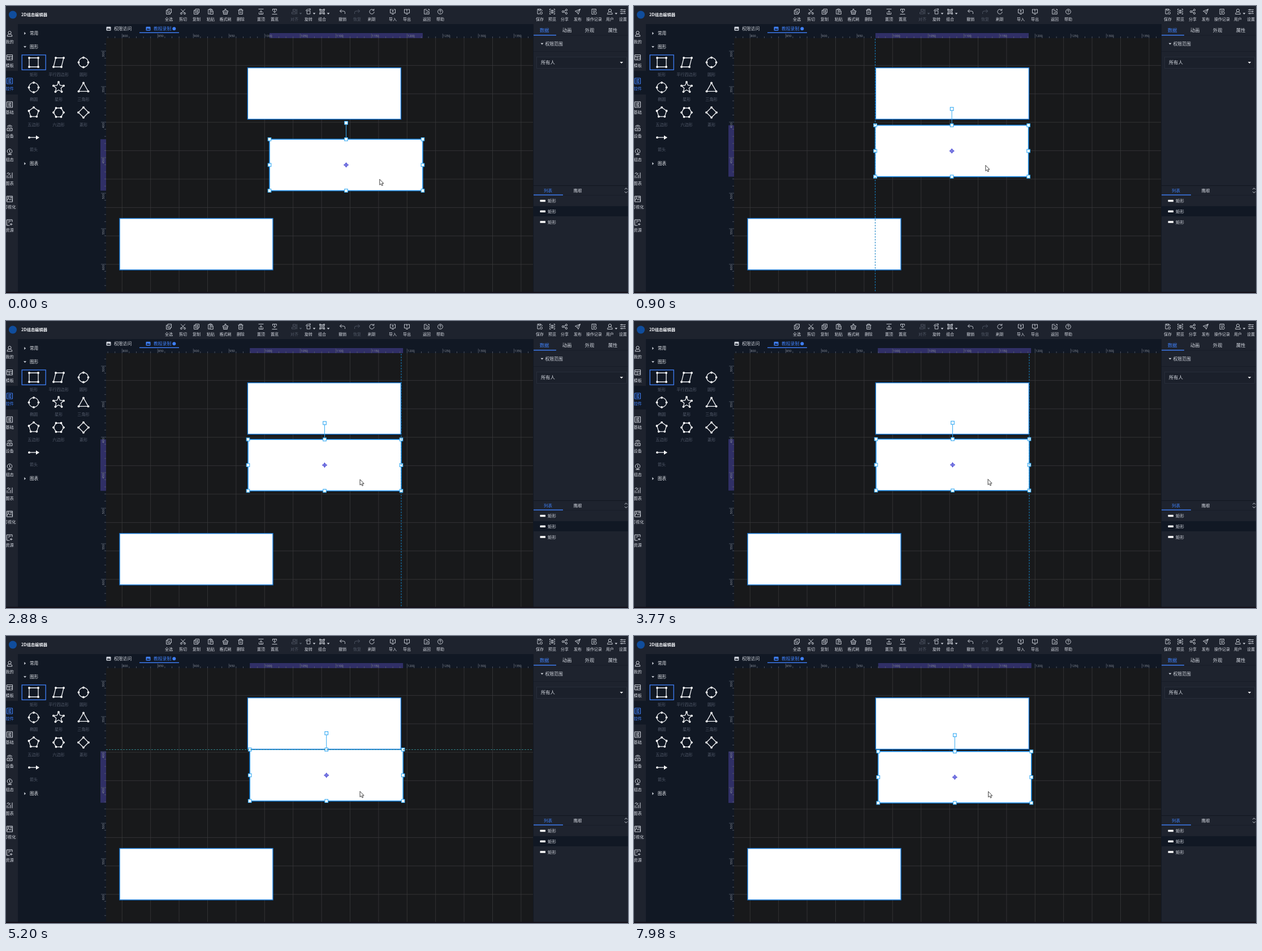
Recreate the animation shown at these times as an HTML page. Size 1100x509 px, loop 8000 ms.

```html
<!DOCTYPE html>
<html lang="zh">
<head>
<meta charset="utf-8">
<title>2D组态编辑器</title>
<style>
html, body { margin: 0; width: 100%; height: 100%; overflow: hidden; background: #1e232e; }
svg { display: block; width: 100vw; height: 100vh; }
text { font-family: "Noto Sans CJK SC", "Noto Sans CJK", "Noto Sans", sans-serif; }
.ruler { font-family: "Noto Sans", sans-serif; }
</style>
</head>
<body>
<svg id="stage" viewBox="0 0 1100 509" xmlns="http://www.w3.org/2000/svg"></svg>
<script>
const BAR = '#1e232e', PANEL = '#111824', BOARD = '#18191b', BLUE = '#3f80fa';
const LIGHT = '#d3d7df', DIM = '#515866', EDGE = '#1879d8', GLOW = '#35aaf3';
const W = 271, H = 91.2;

// Markup helpers
const box = (x, y, w, h, fill, extra = '') =>
  `<rect x="${x}" y="${y}" width="${w}" height="${h}" fill="${fill}" ${extra}/>`;
const path = (d, stroke, width = 1, extra = '') =>
  `<path d="${d}" fill="none" stroke="${stroke}" stroke-width="${width}" ${extra}/>`;
const solid = (d, fill) => `<path d="${d}" fill="${fill}"/>`;
const text = (x, y, s, size = 7, fill = LIGHT, anchor = 'middle', extra = '') =>
  `<text x="${x}" y="${y + size * .38}" font-size="${size}" fill="${fill}" text-anchor="${anchor}" ${extra}>${s}</text>`;
const left = (x, y, s, size, fill, extra) => text(x, y, s, size, fill, 'start', extra);
const ring = (x, y, r) => `M${x - r} ${y}a${r} ${r} 0 1 0 ${2 * r} 0a${r} ${r} 0 1 0 ${-2 * r} 0z`;
const icon = (x, y, d, color = LIGHT, width = 1) =>
  path(d, color, width, `transform="translate(${x} ${y})" stroke-linejoin="round"`);
const caretDown = (x, y, s = 2.5, fill = LIGHT) => solid(`M${x - s} ${y - s / 2}h${2 * s}l${-s} ${s * 1.1}z`, fill);
const caretRight = (x, y) => solid(`M${x - 1.2} ${y - 2.5}v5l2.7-2.5z`, LIGHT);
const picture = (x, y, fill) =>
  box(x - 4, y - 3.5, 8, 7, fill, 'rx="1"') + solid(`M${x - 3} ${y + 2}l2-3 1.5 1.8 1.2-1.4 1.6 2.6z`, PANEL);

const SHEET = 'M3.5-1v-3.5h-7.5v9h3.5M-2-2h4M-2 .5h2';
const LAYERS = 'M-4.5-4.5h9M0 4.5v-6M-2.5 .8L0-1.8 2.5 .8M-3.5 1.5v3h7v-3';
const MIXER = 'M-5-3.3h10M-5 0h10M-5 3.3h10M-2-4.7v2.8M2.5-1.4v2.8M-2 1.9v2.8';
const TRAY = 'M-2-4h-2.5v6.5h9v-6.5h-2.5M-2 4.5h4';
const USER = ring(0, -2, 2.6) + 'M-4.3 4.5q0-4 4.3-4t4.3 4z';
const ARROW_BACK = 'M-4.5-1h6q3 0 3 2.5v2.5M-4.5-1l3-3M-4.5-1l3 3';

function toolbar() {
  const tools = [
    [288, '全选', 'M-2-4.5h6.5v6.5h-6.5zM-2-2.5h-2.5v7h7v-2.5M-.5-1.5l1.5 1.5 2-2.5'],
    [313, '剪切', 'M-3.8-4.5L2.5 2.2M3.8-4.5L-2.5 2.2' + ring(-3, 3.2, 1.5) + ring(3, 3.2, 1.5)],
    [337, '复制', 'M-2-4.5h6.5v6.5h-6.5zM-2-2.5h-2.5v7h7v-2.5M1.2-3.2v4M-.8-1.2h4'],
    [362, '粘贴', 'M-2-3.8h-2.3v8h3M-2-4.8h3v2h-3zM1-3.8h2v2M-1-1h5.3v5.5h-5.3zM.5 1h2.5'],
    [388, '格式刷', 'M-1-4.5h2v3h3.3v2.5h-8.6v-2.5h3.3zM-3.5 1v3.5h7v-3.5M-1 4.5v-2M1.3 4.5v-2'],
    [415, '删除', 'M-4.5-2.7h9M-2-2.7v-1.8h4v1.8M-3.3-2.7v7.2h6.6v-7.2M-1-.5v3M1-.5v3'],
    [451, '置顶', LAYERS], [475, '置底', 'M-4.5 4.5h9M0-4.5v6M-2.5-1L0 1.8 2.5-1M-3.5-1.5v-3h7v3'],
    [510, '对齐', 'M4.5-4.5v9M2.5-4h-5v3h5zM2.5 1h-7v3h7z', DIM],
    [535, '旋转', 'M-2.8-1.5h5.6v5.6h-5.6zM-4.5-1q0-3.3 4-3.3h4M2-5.5l1.8 1.3L2-2.7'],
    [559, '组合', 'M-4.5-4.5h2v2h-2zM2.5-4.5h2v2h-2zM-4.5 2.5h2v2h-2zM2.5 2.5h2v2h-2zM-2.5-3.5h5M-2.5 3.5h5M-3.5-2.5v5M3.5-2.5v5M-1.5-1.5h3v3h-3z'],
    [595, '撤销', ARROW_BACK], [621, '恢复', ARROW_BACK, DIM, -1],
    [647, '刷新', 'M3.2-2.5a4.1 4.1 0 1 0 .9 2.8M3.8-5v2.8h-3'],
    [684, '导入', TRAY + 'M0-4.5v4.5M-1.8-1.8L0 0 1.8-1.8'],
    [709, '导出', TRAY + 'M0 0v-4.5M-1.8-2.7L0-4.5 1.8-2.7'],
    [744, '返回', 'M0-4h-4.3v8.3h8.6v-5M-1.8 2h2.6q1.8 0 1.8-1.8t-1.8-1.8h-2.6M2-4h2.5v2'],
    [768, '帮助', ring(0, 0, 4.4) + 'M-1.5-1q0-1.5 1.5-1.5t1.5 1.3q0 .8-1.5 1.5v.8M0 2v1'],
    [944, '保存', 'M4-1v-1.5l-2-2h-6v8.5h4M-2-4.5v2.5h3.5v-2.5' + ring(2.5, 2.5, 2)],
    [966, '预览', 'M-4.8 0q4.8-5.5 9.6 0q-4.8 5.5-9.6 0zM-4.5-2.5v-2h2M4.5-2.5v-2h-2M-4.5 2.5v2h2M4.5 2.5v2h-2' + ring(0, 0, 1.4)],
    [988, '分享', ring(-3, 0, 1.6) + ring(3, -2.9, 1.6) + ring(3, 2.9, 1.6) + 'M-1.6-.7L1.6-2.2M-1.6 .7L1.6 2.2'],
    [1011, '发布', 'M4.5-4.5L-4.5-.8l3.4 1.9L1 4.5zM4.5-4.5L-1 1'],
    [1040, '操作记录', SHEET + ring(2, 2.4, 2.3)], [1068, '用户', USER], [1091, '设置', MIXER]
  ];
  return tools.map(([x, label, d, color = LIGHT, flip = 1]) =>
    `<g transform="translate(${x} 10) scale(${flip} 1)">${icon(0, 0, d, color, .9)}</g>` + text(x, 23.3, label, 7, color)).join('') +
    [521, 545, 570, 1079].map(x => caretDown(x, 13.5, 2.3, x == 521 ? DIM : LIGHT)).join('') +
    '<circle cx="12" cy="15.5" r="7" fill="#104d9c"/>' +
    left(27, 15.5, '2D组态编辑器', 7.3, '#eef0f4', 'font-weight="700"');
}

function sideNav() {
  const items = [
    ['我的', USER], ['模板', 'M-5-4.5h10v9h-10zM-5-1.5h10M-1-1.5v6M1 1.5h4'],
    ['控件', 'M-5-5h10v10h-10zM-3-2.5h6M-3 0h6M-3 2.5h6M1-3.5v2M-1-1v2M1 1.5v2'],
    ['基础', 'M-5-5h10v10h-10zM-3-2.5h6M-3 0h6M-3 2.5h6M1-3.5v2M-1-1v2M1 1.5v2'],
    ['设备', 'M-4.5 0h9v4.5h-9zM-2 2.2h4M-3-1.5q3-4 6 0M-4.5-3q4.5-4.5 9 0'],
    ['组态', ring(0, -.8, 4.2) + 'M-3.5 5h7M0-3.5v4l2 1.5M0 3.4v1.6'],
    ['图表', 'M-4.5 5v-5M-1.5 5v-3M1.5 5v-6M4.5 5v-10M-4.5-2.5a2 2 0 1 1 2 2M1-4v1'],
    ['可视化', 'M-5-5h10v10h-10zM-5 3l3-4 2.5 3 1.5-2 3 3' + ring(-2, -2.7, 1) + ring(2.5, -2.5, 1)],
    ['资源', 'M4.5-1v-4h-9.5v10h5M-2.5-2.5h4.5M-2.5 0h2M2.5 1v4M.5 3h4.5']
  ];
  return box(0, 115, 21, 42, PANEL) + items.map(([label, d], i) => {
    const y = 49.3 + i * 41.85, color = i == 2 ? BLUE : LIGHT;
    return icon(6.5, y, d, color) + text(6.5, y + 13.6, label, 7.3, color);
  }).join('');
}

// Regular polygon, optionally with a second radius for stars
function ngon(n, r, inner) {
  const count = inner ? n * 2 : n;
  return Array.from({ length: count }, (_, i) => {
    const a = i / count * 2 * Math.PI - Math.PI / 2, q = inner && i % 2 ? inner : r;
    return [q * Math.cos(a), q * Math.sin(a)];
  });
}

function shapePanel() {
  const sides = ngon(4, 8.5);
  const shapes = [
    ['矩形', [[-8, -8], [8, -8], [8, 8], [-8, 8]]],
    ['平行四边形', [[-5, -8], [9, -8], [5, 8], [-9, 8]]],
    ['圆形', sides, 1], ['椭圆', sides, 1],
    ['星形', ngon(5, 9.5, 4.5)], ['三角形', [[0, -8], [8.5, 7], [-8.5, 7]]],
    ['五边形', ngon(5, 9)], ['六边形', ngon(6, 9).map(([x, y]) => [y, x])], ['菱形', ngon(4, 9)],
    ['箭头', [[-8, 0], [5, 0]]]
  ];
  return box(21, 32, 146, 477, PANEL) +
    [[48.5, '常用'], [72.5, '图形'], [279.5, '图表']].map(([y, s], i) =>
      (i == 1 ? caretDown(33.5, y) : caretRight(33.5, y)) + left(42, y, s, 7.6, '#e6e9ee')).join('') +
    box(28.2, 86.8, 42, 26.4, 'none', `stroke="${BLUE}" stroke-width="1.3"`) +
    shapes.map(([label, pts, round], i) => {
      const x = 49 + i % 3 * 44, y = 100 + Math.floor(i / 3) * 44.4;
      const outline = round ? ring(0, 0, 8.5) : 'M' + pts.map(p => p.join(' ')).join('L') + 'z';
      const dots = i == 9 ? solid('M4-3.8v7.6l6-3.8z', '#fff') + '<circle cx="-8" r="1.9" fill="#fff"/>' :
        pts.filter((_, k) => i != 4 || k % 2 == 0).map(p => `<circle cx="${p[0]}" cy="${p[1]}" r="1.9" fill="#fff"/>`).join('');
      return `<g transform="translate(${x} ${y})">${path(outline, '#f2f4f7', 1.3) + dots}</g>` +
        text(x, y + 21.2, label, 7.1, '#535b6b');
    }).join('');
}

function rightPanel() {
  const tabs = [[952, '数据'], [992, '动画'], [1032, '外观'], [1073, '属性']];
  return box(932, 32, 168, 477, BAR) + box(932, 32, 1, 477, '#121721') +
    tabs.map(([x, s], i) => text(x, 42.5, s, 8.4, i ? LIGHT : BLUE)).join('') +
    box(933, 51.5, 167, .8, '#171c26') + box(933, 51, 40, 1.4, BLUE) +
    caretDown(948, 67) + left(953.5, 67, '权限范围', 7.8) + box(933, 80, 167, 1, '#171c26') +
    box(938.5, 90.5, 159, 20, '#1b202b', 'stroke="#2b313d" stroke-width=".8"') +
    left(946, 100.3, '所有人', 8.3) + caretDown(1088.5, 100.3, 2.8, '#fff') +
    box(933, 318, 167, 1, '#12161f') + text(958.5, 327.3, '列表', 7.4, BLUE) + text(1011, 327.3, '鹰眼', 7.4) +
    box(933, 335, 167, .8, '#171c26') + box(933, 334.4, 52, 1.4, BLUE) +
    path('M1094.2 325.2l2.3-2.3 2.3 2.3M1094.2 329.2l2.3 2.3 2.3-2.3', LIGHT) +
    box(933, 355, 167, 18, PANEL) +
    [345.5, 364.2, 383].map(y => box(944.5, y - 1.8, 9.5, 3.6, '#fff', 'rx=".5"') + left(958, y, '矩形', 7.4)).join('');
}

function fileTabs() {
  return box(167, 32, 765, 16, PANEL) +
    picture(181.5, 40.3, LIGHT) + left(191, 40.3, '权限访问', 7.8) +
    picture(251.5, 40.3, BLUE) + left(261, 40.3, '教程录制', 7.8, BLUE) +
    `<circle cx="297.3" cy="40.3" r="3" fill="${BLUE}"/>` + box(236, 46.6, 70, 1.4, BLUE);
}

// One board unit is 1.26 px; grid every 40 units, ruler ticks every 10
function grid() {
  let d = '';
  for (let x = 205.3; x < 932; x += 50.4) d += `M${x} 57V507`;
  for (let y = 105.4; y < 507; y += 50.4) d += `M177 ${y}H932`;
  return box(177, 57, 755, 450, BOARD) + path(d, '#39393b', .8);
}

function rulerMarks() {
  let d = '', labels = '';
  for (let k = -2; k < 58; k++) {
    const x = 205.3 + k * 12.6, major = k % 5 == 0;
    if (x < 932) d += `M${x} ${major ? 49 : 54}V57`;
    if (major && x < 930) labels += left(x + 1, 52.6, 800 + k * 10, 5.4, '#8d929d', 'class="ruler"');
  }
  for (let k = -1; k < 34; k++) {
    const y = 80 + k * 12.6, major = k % 5 == 0;
    if (y < 507) d += `M${major ? 168 : 174} ${y}H177`;
    if (major && y < 490)
      labels += `<g transform="translate(171.8 ${y + 10.5}) rotate(-90)">${left(0, 0, 300 + k * 10, 5.4, '#8d929d', 'class="ruler"')}</g>`;
  }
  return path(d, '#5a606c', .8) + labels;
}

const block = (x, y) => box(x, y, W, H, '#fff', `stroke="${EDGE}" stroke-width="1.4"`);

function selection() {
  let handles = '';
  for (const x of [0, W / 2, W]) for (const y of [0, H / 2, H])
    if (x != W / 2 || y != H / 2) handles += handle(x, y);
  const cx = W / 2, cy = H / 2;
  return box(0, 0, W, H, '#fff', 'stroke="#1f8fea" stroke-width="1.6"') +
    path(`M${cx} 0V-29`, GLOW) + handle(cx, -29) + handles +
    path(ring(cx, cy, 2.7) + `M${cx - 4.5} ${cy}h9M${cx} ${cy - 4.5}v9`, '#2f2fd0', 1);
}
function handle(x, y) {
  return box(x - 2.8, y - 2.8, 5.6, 5.6, '#fff', `stroke="${GLOW}" stroke-width="1.1"`);
}

const stage = document.getElementById('stage');
stage.innerHTML = box(0, 0, 1100, 509, BAR) + toolbar() + sideNav() + shapePanel() + fileTabs() + grid() +
  block(427.4, 109.6) + block(201, 376.8) +
  `<g id="picked">${selection()}</g>` +
  path('M0 58V507', '#1583c4', 1, 'id="guideX" stroke-dasharray="3 2"') +
  path('M177 201.5H932', '#2f7f86', 1, 'id="guideY" stroke-dasharray="3 2"') +
  box(167, 48, 765, 9, PANEL) + box(167, 48, 10, 459, PANEL) +
  box(0, 48, W, 9, '#302f66', 'id="spanX"') + box(167, 0, 10, H, '#302f66', 'id="spanY"') +
  rulerMarks() + rightPanel() + box(0, 507, 1100, 2, '#130f18') +
  '<path id="pointer" d="M0 0v10l2.3-2 1.6 3.4 1.7-.8-1.5-3.2h3z" fill="#fff" stroke="#2b2b2b" stroke-width=".9"/>';

// Drag steps: time, x, y under the pointer, and the edge it snaps to
const SNAP = { L: 426.6, R: 428, T: 201.4 };
const steps = [
  [0, 466, 236.3], [140, 463, 233.5], [260, 458, 230], [380, 453, 227], [500, 448, 224.3],
  [640, 440, 219], [780, 433, 215], [900, 427, 211.5, 'L'], [1170, 428, 210.5], [1320, 428, 209.5, 'L'],
  [1570, 429, 209.5], [1690, 429.5, 209.5, 'R'], [1940, 430.2, 209.5], [2080, 431, 210, 'R'],
  [2200, 431.2, 209.5], [2880, 431.2, 210, 'R'], [3000, 431.2, 209.5, 'R'], [3120, 431.2, 210],
  [3770, 431.2, 209.5, 'R'], [3890, 431.2, 209], [4030, 430.8, 208.2], [4280, 431.7, 207.2],
  [4530, 431.7, 206], [4680, 431.7, 204.5, 'T'], [4800, 431.7, 205.5], [4920, 431.7, 204.5, 'T'],
  [5200, 431.2, 204.5, 'T'], [5350, 431.2, 206], [5470, 431.2, 204.5, 'T'], [6280, 431.8, 204.8],
  [6400, 431.8, 206], [6520, 431.8, 204.8, 'T'], [7040, 431.8, 204.2, 'T'], [7190, 431.8, 205.5],
  [7310, 431.8, 204.5, 'T'], [7430, 431.8, 206], [7860, 431.8, 205.4], [7980, 431.8, 204.8]
];

const el = id => document.getElementById(id);
const [picked, guideX, guideY, spanX, spanY, pointer] =
  ['picked', 'guideX', 'guideY', 'spanX', 'spanY', 'pointer'].map(el);
const move = (node, x, y) => node.setAttribute('transform', `translate(${x} ${y})`);
const show = (node, on) => node.setAttribute('visibility', on ? 'visible' : 'hidden');

function draw(t) {
  const [, x, y, snap] = steps.findLast(s => s[0] <= t);
  const left = snap == 'L' || snap == 'R' ? SNAP[snap] : x;
  move(picked, left, snap == 'T' ? SNAP.T : y);
  move(guideX, snap == 'R' ? left + W : left, 0);
  show(guideX, snap == 'L' || snap == 'R');
  show(guideY, snap == 'T');
  spanX.setAttribute('x', x);
  spanY.setAttribute('y', y);
  move(pointer, x + 194.8, y + 71);
}

const start = performance.now();
function tick() {
  draw((performance.now() - start) % 8000);
  requestAnimationFrame(tick);
}
tick();
</script>
</body>
</html>
```
